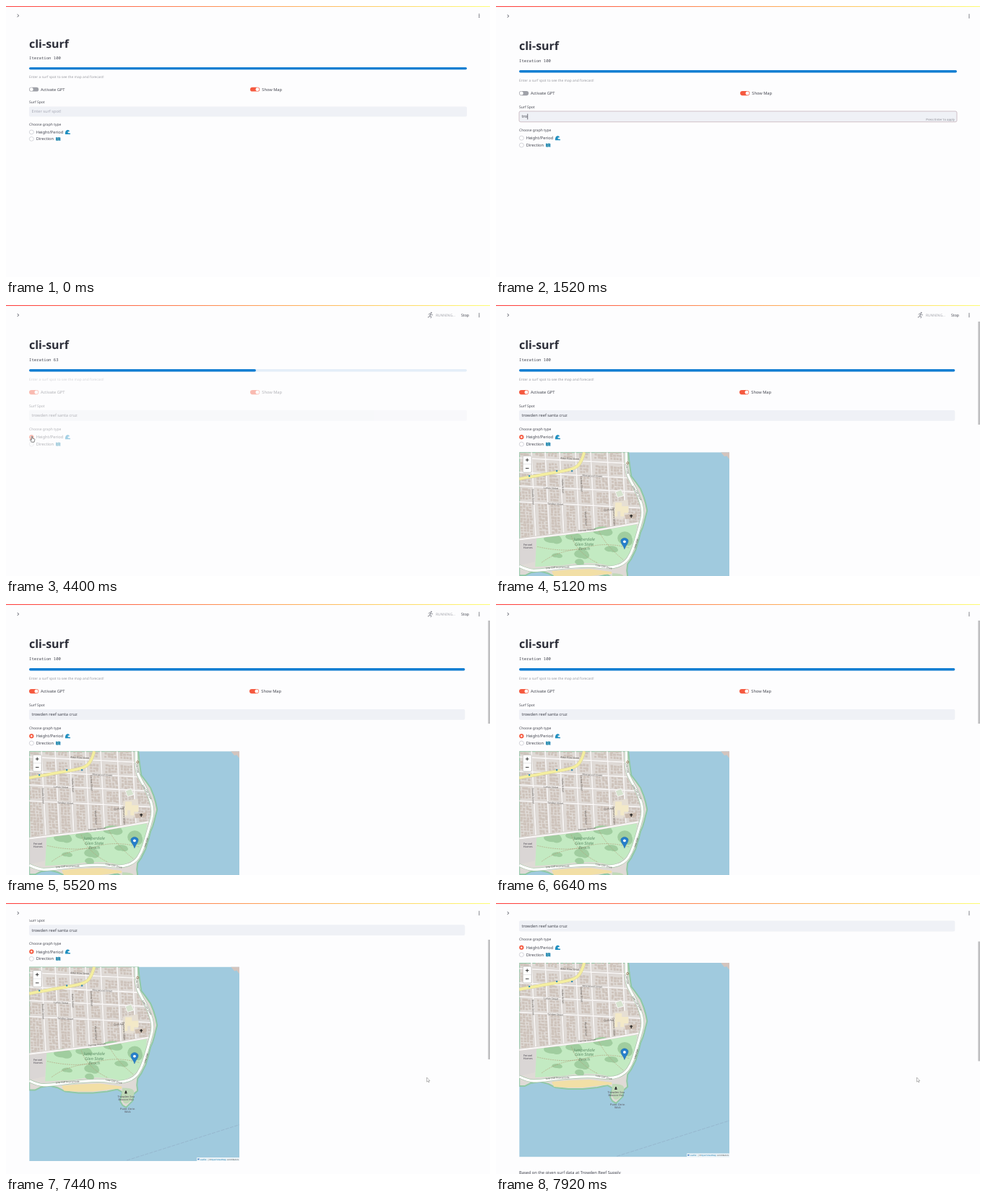
An HTML page for the animation above (8000 ms loop, 670 by 376 pixels).

```html
<!DOCTYPE html>
<html lang="en">
<head>
<meta charset="utf-8">
<title>cli-surf</title>
<style>
html, body { margin: 0; width: 100%; height: 100%; overflow: hidden; background: #fdfdfe; }
svg { display: block; width: 670px; height: 376px; }
text { font-family: "Noto Sans", "Open Sans", sans-serif; font-size: 5.7px; fill: #454751; text-rendering: geometricPrecision; white-space: pre; }
.title { font-size: 16px; font-weight: 700; fill: #2b2d38; }
.mono { font-family: "Noto Sans Mono", "DejaVu Sans Mono", monospace; font-size: 5.65px; }
.cap { font-size: 4.85px; fill: #9b9ca3; }
.lab { font-size: 5px; }
.hint { font-size: 4.27px; fill: #8b8c94; text-anchor: end; }
.park { font-size: 5.8px; font-style: italic; fill: #5d8d66; text-anchor: middle; }
.place { font-size: 3.9px; fill: #55505a; text-anchor: middle; }
.street { font-size: 3.4px; fill: #55504c; text-anchor: middle; }
.attr { font-size: 2.8px; fill: #444; }
</style>
</head>
<body>
<svg viewBox="0 0 670 376" xmlns="http://www.w3.org/2000/svg">
<defs>
  <linearGradient id="rainbow"><stop stop-color="#ff4b4b"/><stop offset="1" stop-color="#fffd80"/></linearGradient>
  <clipPath id="frame"><rect width="291" height="269.5"/></clipPath>
  <clipPath id="town"><path d="M0 0H146L146 30L164 62L169 82L165 97L108 106L0 119Z"/></clipPath>
</defs>
<g id="all">
  <g id="page">
    <text class="title" x="32" y="61">cli-surf</text>
    <text class="mono" x="32" y="77.5" id="iter"></text>
    <rect class="wide" x="32" y="89" height="3.4" rx="1.7" fill="#e4eef8"/>
    <rect id="bar" x="32" y="89" height="3.4" rx="1.7" fill="#147fd2"/>
    <g id="form">
      <text class="cap" x="32" y="104.7">Enter a surf spot to see the map and forecast!</text>
      <rect id="track" x="32" y="118" width="13.2" height="6.2" rx="3.1"/>
      <circle id="knob" cy="121.1" r="2.5" fill="#fff"/>
      <text x="48" y="123.1">Activate GPT</text>
      <g id="col">
        <rect x="338" y="118" width="13.2" height="6.2" rx="3.1" fill="#f5593f"/>
        <circle cx="348" cy="121.1" r="2.5" fill="#fff"/>
        <text x="354.3" y="123.1">Show Map</text>
      </g>
      <text class="lab" x="32" y="141.7">Surf Spot</text>
      <rect class="wide" id="box" x="32" y="146" height="14.8" rx="2" fill="#eff1f6" stroke-width=".8"/>
      <text id="typed" x="35.5" y="155.4"></text>
      <path id="caret" d="M0 149.6V157.4" stroke="#31333f" stroke-width=".7"/>
      <text class="hint" id="hint" x="635" y="158.6">Press Enter to apply</text>
      <text class="lab" x="32" y="173.7">Choose graph type</text>
      <circle id="dot" cx="35.3" cy="183.2" r="3"/>
      <circle id="hole" cx="35.3" cy="183.2" r="1.2" fill="#fff"/>
      <text x="41.7" y="185.3">Height/Period</text>
      <path d="M82 186.3C81.6 181.5 84 180 86 180.2C88 180.4 88.5 182.3 87 182.8C86 181.8 84.8 183 86 184.3C87 185.2 88.5 184.7 89 185V186.3Z" fill="#1f8fc0"/>
      <circle cx="35.3" cy="193.1" r="3" fill="#fff" stroke="#c3c5cc" stroke-width=".7"/>
      <text x="41.7" y="195.2">Direction</text>
      <path d="M69 190.5L71 191L73 190.5L75.3 191V195.8L73 195.3L71 195.8L69 195.3Z" fill="#2487b5"/>
      <path d="M71 191V195.8M73 190.5V195.3" stroke="#a9d9c0" stroke-width=".5"/>
    </g>
    <g id="after">
      <g id="map" transform="translate(32.2 204.3)" clip-path="url(#frame)"></g>
      <text x="32" y="497.7">Based on the given surf data at Trowden Reef Supply</text>
    </g>
  </g>
  <rect id="thumb" x="667.4" width="2.6" height="166" fill="#bfbfc1"/>
  <rect width="670" height="23" fill="#fdfdfe"/>
  <rect width="670" height="1.2" fill="url(#rainbow)"/>
  <path d="M15.7 12L17.7 14L15.7 16" fill="none" stroke="#31333f" stroke-width=".8"/>
  <path d="M655 11.8v.01M655 14v.01M655 16.2v.01" stroke="#31333f" stroke-width="1.3" stroke-linecap="round"/>
  <g id="run">
    <circle cx="588.7" cy="10.7" r=".9" fill="#777983"/>
    <path d="M588 12.3L586.7 14.8L588.6 16L588 18.3M586.7 14.8L585.8 16.6L583.8 17M585 13.3L586.2 12L588 12.3L589.2 13.8L590.8 13.8" fill="none" stroke="#777983" stroke-width=".9"/>
    <text x="595" y="15.8" style="font-size:4.9px;fill:#a4a5ac">RUNNING...</text>
    <text x="630" y="15.9" style="font-size:5.2px">Stop</text>
  </g>
  <path id="arrow" d="M0 0V6.2L1.5 4.9L2.5 7L3.4 6.6L2.5 4.6H4.3Z" fill="#fff" stroke="#777" stroke-width=".5"/>
  <path id="hand" d="M-.7 0Q0 -.8 .7 0V2.5L3.3 3.2Q4 3.6 3.7 5L3 7.7H-.6L-2.6 4.6Q-2.5 3.6 -1.5 4.2L-.7 5Z" fill="#fff" stroke="#333" stroke-width=".6"/>
</g>
</svg>
<script>
const LOOP = 8000, SPOT = "trowden reef santa cruz";
const FOCUS = 960, ENTER = 2860, GPT = 3440, PICK = 3880, MAP = 5020, DONE = 5840;
const $ = id => document.getElementById(id);
const set = (node, attrs) => { for (const k in attrs) node.setAttribute(k, attrs[k]); };
const show = (node, on) => { node.style.display = on ? "" : "none"; };

function add(tag, attrs, text) {
  const node = document.createElementNS("http://www.w3.org/2000/svg", tag);
  set(node, attrs);
  if (text) node.textContent = text;
  $("map").append(node);
  return node;
}

// Piecewise linear value from a table of [time, value]
function at(t, table) {
  const i = table.findIndex(row => row[0] > t);
  if (i < 0) return table[table.length - 1][1];
  if (i === 0) return table[0][1];
  const [t0, a] = table[i - 1], [t1, b] = table[i];
  return a + (b - a) * (t - t0) / (t1 - t0);
}

// Soft curve through the midpoints of a string of x,y pairs
function curve(str) {
  const p = str.split(" ").map(s => s.split(",").map(Number));
  let d = "M" + p[0];
  for (let i = 1; i < p.length - 1; i++)
    d += `Q${p[i]} ${(p[i][0] + p[i + 1][0]) / 2},${(p[i][1] + p[i + 1][1]) / 2}`;
  return d + "L" + p[p.length - 1];
}

function drawMap() {
  const line = (d, stroke, w, more) => add("path", { d, fill: "none", stroke, "stroke-width": w, ...more });
  const fill = (d, color, more) => add("path", { d, fill: color, ...more });
  const label = (cls, x, y, text, turn = 0) =>
    add("text", { class: cls, transform: `translate(${x} ${y}) rotate(${turn})` }, text);

  add("rect", { width: 291, height: 269.5, fill: "#a0cade" });
  fill("M0 0H151L152 11L154 26L155 33L161 41L168 51L172 61L175 71L177 81L175 89L173 97L171 104L168 111L165 123L161 136L155 148L150 155L149 164L150 172L144 177L143 186L139 190L134 195L129 192L126 187L127 180L129 174L122 170L108 173L88 175L68 175L50 173L40 168L28 165L16 167L8 171L0 171Z",
    "#dfdad6", { stroke: "#8fc9a5", "stroke-width": 2, "stroke-linejoin": "round" });
  fill("M279 0H291V10L287 5L284 6Z", "#d3c4bd");

  // Houses fill the blocks between the streets
  let seed = 7;
  const rnd = () => (seed = seed * 16807 % 2147483647) / 2147483647;
  const rows = [-14, 8, 28, 47, 69], cols = [-7, 17, 36, 56, 78, 99, 122, 143];
  const near = (v, list, gap) => list.some(s => Math.abs(v - s) < gap);
  let homes = "", roads = "";
  for (let y = -16; y < 122; y += 4.1)
    for (let x = -8; x < 172; x += 4.3)
      if (!near(y + 1.7, rows, 2.7) && !near(x + 1.9, cols, 2.7)) {
        const w = 2.6 + rnd() * 1.6, h = 2.4 + rnd() * 1.4;
        homes += `M${(x + rnd()).toFixed(1)} ${(y + rnd()).toFixed(1)}h${w.toFixed(1)}v${h.toFixed(1)}h${(-w).toFixed(1)}z`;
      }
  rows.forEach(y => roads += `M-20 ${y}H180`);
  cols.forEach(x => roads += `M${x} -20V125`);
  const town = add("g", { "clip-path": "url(#town)" });
  const grid = { transform: "matrix(1 .05 .05 1 0 0)" };
  town.append(
    fill(homes, "#cec3bb", grid),
    line(roads, "#cfc8c4", 2.6, grid), line(roads, "#f8f6f5", 1.8, grid));

  fill("M130 69L150 66L152 82L144 93L129 92Z", "#e6dfd4");
  fill("M133 70h9v5h9v9h-6v5h-5v-7h-4v7h-4z", "#f3e9c8");
  fill("M146 87l16 -2v6l-15 2z", "#cdbdb0");
  fill("M133 55l8 -3l4 8l-9 3z", "#d6e3cf", { stroke: "#f8f6f5", "stroke-width": 1 });

  fill("M0 121L24 118L22 152L0 157Z", "#dad6d5");
  fill("M24 119L108 108L163 100Q162 120 153 139Q146 153 128 158Q95 150 60 157L22 159Z", "#c3eac2");
  const woods = [[46, 120, 12, 6], [75, 117, 11, 5], [115, 109, 13, 6], [146, 119, 10, 9], [86, 141, 10, 6], [52, 143, 7, 3], [83, 152, 6, 4], [127, 134, 9, 4]];
  woods.forEach(([cx, cy, rx, ry]) => {
    add("ellipse", { cx, cy, rx, ry, fill: "#a0cd9f" });
    add("ellipse", { cx: cx + rx * .5, cy: cy + ry * .4, rx: rx * .6, ry: ry * .8, fill: "#a0cd9f" });
  });
  line("M25 131Q65 140 93 132T153 133M72 116Q80 140 109 154M110 109Q120 130 145 150M31 153Q55 135 92 134",
    "#b29a78", .6, { "stroke-dasharray": "2 1" });
  fill("M45 165L70 163L98 162L128 166L128 169L112 170L88 173L65 173L48 172Z", "#f2dfa6");
  fill(curve("129,168 143,168 146,176 141,186 134,191 129,187 128,177") + "Z", "#c0d9b8");

  const drive = curve("0,158 12,164 28,164 58,160 98,157 128,161 146,154 155,141 161,123 167,102 172,83 166,61 154,39 148,26 148,0");
  line(drive, "#a8c6aa", 4.6);
  line(drive, "#fff", 3.2);
  line("M0 121L108 108L165 98", "#cfc7c3", 2.9);
  line("M0 121L108 108L165 98", "#f8f6f5", 2.2);
  const main = curve("0,37 38,30 68,25 81,20 87,10 90,0");
  line(main, "#cfc797", 4.4);
  line(main, "#f4eea0", 3.7);
  [[14, 33], [52, 26], [73, 26]].forEach(([x, y]) => add("rect", { x: x - 1, y: y - 1, width: 2, height: 2, fill: "#1b83b5" }));
  line("M135 268.5Q225 240 291 219", "#8aa3bd", .5, { "stroke-dasharray": "5 1.5" });

  [[70, 10, "Alder Row Street", 3], [101, 34, "Mosswood Street", 3], [44, 51, "Larkin Street", 3],
   [50, 73, "Tamber Street", 3], [124, 81, "Quill Ave", -3], [94, 109, "Ferrow Avenue", -6],
   [18, 62, "Brindle Street", 87], [59, 47, "Hollin Street", 87], [85, 44, "Corrow Street", 87],
   [91, 92, "Wexel Street", 87], [130, 89, "Dunmere Street", 87], [162, 57, "Low Cliff Drive", 60],
   [148, 23, "Low Cliff", 84], [53, 161, "Low Cliff Promenade", -3], [117, 160, "Low Cliff Drive", 12],
   [163, 127, "Low Cliff", -70]].forEach(s => label("street", ...s));
  ["Juniperdale", "Glen State", "Beach"].forEach((s, i) => label("park", 90, 122.7 + i * 6.6, s));
  ["Fennel", "Homes"].forEach((s, i) => label("place", 12, 130 + i * 4, s));
  ["Trowden Sea", "Beacon Hut"].forEach((s, i) => label("place", 134, 181 + i * 4.3, s));
  ["Point Orrin", "Wick"].forEach((s, i) => label("place", 136, 198 + i * 4.3, s));
  line("M155 86.5V91M153 88.2H157", "#222", 1.3);
  fill("M132 176l1 -4h1.5l1 4z", "#333");
  add("circle", { cx: 150, cy: 15, r: 1.5, fill: "none", stroke: "#8b6238", "stroke-width": .7 });

  fill("M145.7 134.5Q144.8 131 142 127.5Q139.5 123 141.5 120.8Q145.7 117 150 120.8Q152 123 149.4 127.5Q146.7 131 145.7 134.5Z",
    "#267fca", { stroke: "#1f6aa8", "stroke-width": .5 });
  add("circle", { cx: 145.7, cy: 124, r: 1.9, fill: "#fff" });

  add("rect", { x: 5, y: 5, width: 12, height: 23, rx: 1.5, fill: "#fff", stroke: "#b5b2ae", "stroke-width": .7 });
  line("M5 16.5H17", "#ccc", .5);
  line("M8.7 10.7H13.3M11 8.4V13M8.7 22.3H13.3", "#222", .9);
  add("rect", { x: 232, y: 264.5, width: 59, height: 5, fill: "#fff", "fill-opacity": .8 });
  add("rect", { x: 233, y: 266, width: 2.5, height: 1.7, fill: "#4b86c9" });
  add("text", { class: "attr", x: 236.5, y: 268.2, style: "fill:#1679ad" }, "Leaflet");
  add("text", { class: "attr", x: 247, y: 268.2 }, "| ©");
  add("text", { class: "attr", x: 251.8, y: 268.2, style: "fill:#1679ad" }, "OpenStreetMap");
  add("text", { class: "attr", x: 273.8, y: 268.2 }, "contributors");
}

const KEYS = [[1100, 0], [1500, 3], [2160, 12], [2380, 13], [2560, 20], [2720, 23]];
const COUNT = [[ENTER, 100], [ENTER + 1, 0], [GPT, 70], [GPT + 1, 0], [PICK, 55], [PICK + 1, 0], [4400, 63.4], [4720, 100]];
const BAR = [[ENTER, 1], [3020, .06], [GPT, .55], [3540, .08], [PICK, .4], [3980, .06], [4400, .517], [4840, 1]];
const FADE = [[ENTER, 1], [3180, .4], [4720, .4], [4880, 1]];
const MOUSE_X = [[2900, 130], [3400, 38], [3600, 38], [3850, 36], [4500, 36], [4900, 62]];
const MOUSE_Y = [[2900, 172], [3400, 121], [3600, 121], [3850, 182.5], [4500, 182.5], [4900, 221]];

function draw(t) {
  const zoom = at(t, [[60, 0], [620, 1]]);
  const scale = .955 + .045 * zoom * zoom * (3 - 2 * zoom);
  $("all").setAttribute("transform", `scale(1 ${scale})`);

  const mapped = t >= MAP, right = mapped ? 635.3 : 638, width = right - 32;
  document.querySelectorAll(".wide").forEach(n => n.setAttribute("width", width));
  $("col").setAttribute("transform", `translate(${mapped ? -1 : 0} 0)`);
  $("iter").textContent = "Iteration " + Math.floor(at(t, COUNT));
  $("bar").setAttribute("width", width * at(t, BAR));
  $("form").setAttribute("opacity", at(t, FADE));

  const on = at(t, [[GPT, 0], [GPT + 100, 1]]);
  $("knob").setAttribute("cx", 35.2 + 6.8 * on);
  $("track").setAttribute("fill", on > .4 ? "#f5593f" : "#9fa1a8");

  const n = Math.floor(at(t, KEYS)), focus = t >= FOCUS && t < ENTER;
  $("typed").textContent = n ? SPOT.slice(0, n) : "Enter surf spot!";
  $("typed").style.fill = n ? "" : "#a9abb7";
  $("box").setAttribute("stroke", focus ? "#c6b3bb" : "none");
  show($("hint"), focus && n > 0);
  show($("caret"), focus);
  if (focus) $("caret").setAttribute("transform",
    `translate(${n ? 36 + $("typed").getComputedTextLength() : 35.5} 0)`);

  const picked = t >= PICK;
  set($("dot"), { fill: picked ? "#f5593f" : "#fff", stroke: picked ? "#f5593f" : "#c3c5cc", "stroke-width": picked ? .3 : .7 });
  show($("hole"), picked);

  const k = Math.max(0, t - 6720) * .00658;
  const scroll = 121.8 * (1 - (1 + k) * Math.exp(-k));
  $("page").setAttribute("transform", `translate(0 ${-scroll})`);
  show($("after"), mapped);
  show($("thumb"), mapped);
  $("thumb").setAttribute("y", scroll * .44);
  show($("run"), t >= ENTER && t < DONE);

  const late = t >= 6900, moving = t >= 2900 && t < 4960;
  const link = moving && (t > 3340 && t < 3640 || t > 3800 && t < 4600);
  const x = late ? 582.5 : at(t, MOUSE_X), y = late ? 242 : at(t, MOUSE_Y);
  show($("arrow"), late || moving && !link);
  show($("hand"), link);
  $("arrow").setAttribute("transform", `translate(${x} ${y})`);
  $("hand").setAttribute("transform", `translate(${x} ${y})`);
}

drawMap();
const start = performance.now();
function tick() {
  draw((performance.now() - start) % LOOP);
  requestAnimationFrame(tick);
}
tick();
</script>
</body>
</html>
```
